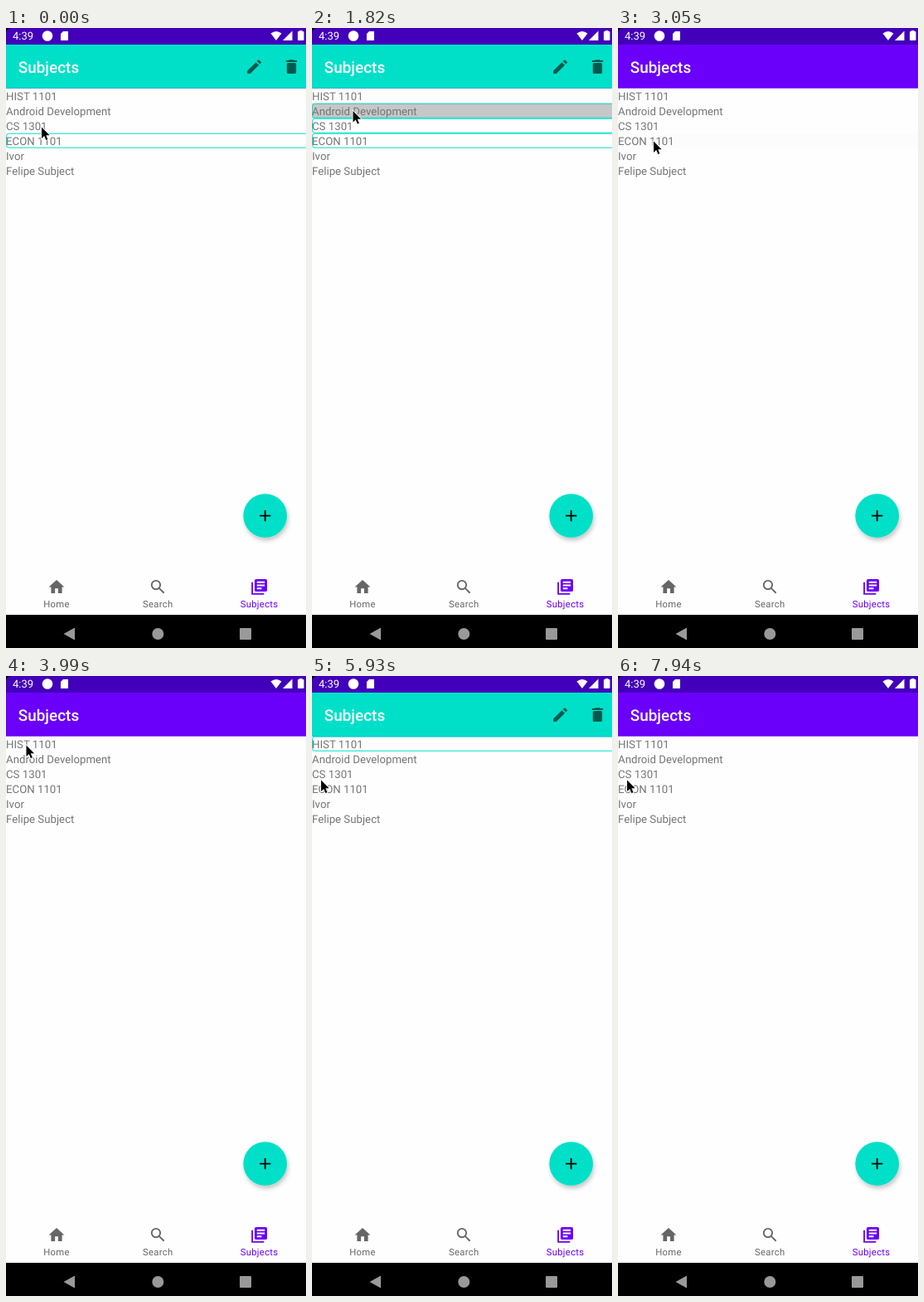
Recreate the animation shown at these times as an HTML page. Size 362x747 px, loop 8 s.

```html
<!DOCTYPE html>
<html lang="en">
<head>
<meta charset="utf-8">
<title>Subjects</title>
<style>
  :root { --teal: #00e0c8; --purple: #6b00fa; --paper: #fefefe; }
  html, body { margin: 0; width: 100%; height: 100%; overflow: hidden; background: var(--paper); }
  svg { display: block; width: 100%; height: 100%; }
  text { font-family: Roboto, sans-serif; text-rendering: geometricPrecision; }
  .title { font-size: 18.9px; font-weight: 500; fill: #fff; }
  .row { font-size: 13.24px; fill: #757575; }
  .tab { font-size: 11.3px; letter-spacing: .3px; text-anchor: middle; }
  .outline { fill: none; stroke: var(--teal); }
  .line { fill: none; stroke: currentColor; stroke-width: 2; }
</style>
</head>
<body>
<svg viewBox="0 0 362 747">
  <defs>
    <filter id="shadow" x="-30%" y="-30%" width="160%" height="170%">
      <feDropShadow dx="1.5" dy="3.5" stdDeviation="2.5" flood-opacity=".22"/>
    </filter>
  </defs>
  <rect width="362" height="747" fill="var(--paper)"/>

  <!-- Status bar -->
  <rect width="362" height="20" fill="#4200ba"/>
  <path d="M0 0H6A6 6 0 0 0 0 6Z"/>
  <g fill="#fff">
    <text x="8" y="14" font-size="13">4:39</text>
    <circle cx="50" cy="9.5" r="6.3"/>
    <path d="M69 4H75V15H66V7Z"/>
    <path d="M319.5 6.5Q326 1.5 332.5 6.5L326 15Z"/>
    <path d="M345.5 3.5V15H334Z"/>
    <rect x="352" y="4" width="7.5" height="11" rx="1"/>
    <rect x="354" y="3" width="3.5" height="2"/>
  </g>

  <!-- App bar -->
  <rect y="20" width="362" height="52.7" fill="var(--purple)"/>
  <rect id="tealBar" y="20" width="362" height="52.7" fill="var(--teal)"/>
  <text class="title" x="14.8" y="54">Subjects</text>
  <g id="actions" fill-opacity=".6">
    <path transform="translate(288.4 35.3) scale(.943)"
      d="M3 21V17.2L14 6.2 17.8 10 6.8 21ZM15.2 5 17.4 2.8 21.2 6.6 19 8.8Z"/>
    <g transform="translate(333.2 35.3) scale(.943)">
      <rect x="6" y="7" width="12" height="14" rx="1.8"/>
      <path d="M5 6V4H8.5L9.5 3H14.5L15.5 4H19V6Z"/>
    </g>
  </g>

  <g id="list"></g>

  <!-- Add button -->
  <circle cx="312.7" cy="587.6" r="26.4" fill="var(--teal)" filter="url(#shadow)"/>
  <path d="M306 587.6H319.4M312.7 581V594.3" stroke="#000" stroke-width="1.9"/>

  <g id="tabs"></g>

  <!-- System navigation -->
  <rect y="707" width="362" height="40"/>
  <g fill="#999">
    <path d="M83 722.5V737.5L69.5 730Z"/>
    <circle cx="183.3" cy="730" r="7"/>
    <rect x="282" y="723" width="14" height="14" rx="1"/>
  </g>

  <path id="cursor" d="M1 1V14.5L4.2 11.6 6.3 16.6 8.4 15.7 6.3 10.8H10.6Z"
    stroke="#fff" stroke-width="1.6" paint-order="stroke"/>
</svg>

<script>
const LOOP = 8000;
const ROW_TOP = 72.7, ROW_HEIGHT = 18;
const RIPPLE_IN = 160, SELECT = 290, BAR_FADE = 330, RELEASE = 360, RIPPLE_OUT = 200;

const subjects = ["HIST 1101", "Android Development", "CS 1301", "ECON 1101", "Ivor", "Felipe Subject"];
const tabs = [
  { label: "Home", icon: `<path d="M10 20H5V12H2L12 3 22 12H19V20H14V14H10Z"/>` },
  { label: "Search", icon: `<circle class="line" cx="9.5" cy="9.5" r="5.5"/><path class="line" d="M13.5 13.5 19.8 19.8"/>` },
  { label: "Subjects", icon: `<rect x="6" y="2" width="16" height="16" rx="2"/><path class="line" d="M3 6V21H18"/>
    <path class="line" style="color: var(--paper)" d="M9 6H19M9 10H19M9 14H15"/>`, active: true }
];

// Each tap names the rows that stay selected after it.
const taps = [
  { at: -LOOP, row: 3, selected: [3] },
  { at: 520, row: 2, selected: [2, 3] },
  { at: 1490, row: 1, selected: [1, 2, 3] },
  { at: 2500, row: 3, selected: [] },
  { at: 4200, row: 0, selected: [0] },
  { at: 6400, row: 2, selected: [2] },
  { at: 7140, row: 2, selected: [] }
];
const moves = [
  { at: 50, over: 1, x: 38.5, y: 114.5 },
  { at: 930, over: 170, x: 48.5, y: 99 },
  { at: 1960, over: 210, x: 42, y: 135.5 },
  { at: 3350, over: 640, x: 23.5, y: 82.5 },
  { at: 5270, over: 1, x: 19, y: 82.5 },
  { at: 5760, over: 170, x: 10, y: 124.5 }
];

const byId = id => document.getElementById(id);
const clamp = v => Math.max(0, Math.min(1, v));
const ease = v => (v = clamp(v), v * v * (3 - 2 * v));
const mix = (a, b, p) => a + (b - a) * p;

byId("list").innerHTML = subjects.map((name, i) => {
  const y = ROW_TOP + i * ROW_HEIGHT;
  return `<rect class="press" y="${y}" width="362" height="${ROW_HEIGHT}"/>
    <rect class="outline" x=".5" y="${y + .5}" width="370" height="${ROW_HEIGHT - 1}" rx="3"/>
    <text class="row" y="${y + 14.2}">${name}</text>`;
}).join("");

byId("tabs").innerHTML = tabs.map(({ label, icon, active }, i) => {
  const x = 61 + i * 122.3;
  return `<g fill="currentColor" style="color: ${active ? "var(--purple)" : "#666"}">
    <g transform="translate(${x - 11.3} 662.1) scale(.943)">${icon}</g>
    <text class="tab" x="${x}" y="697.5">${label}</text></g>`;
}).join("");

const pressRects = document.querySelectorAll(".press");
const outlines = document.querySelectorAll(".outline");

function ripple(age) {
  return Math.min(clamp(age / RIPPLE_IN), clamp((RELEASE + RIPPLE_OUT - age) / RIPPLE_OUT));
}

function draw(t) {
  const { selected } = taps.findLast(tap => t >= tap.at + SELECT);
  subjects.forEach((_, i) => {
    const shade = taps.filter(tap => tap.row === i).map(tap => ripple(t - tap.at));
    outlines[i].style.display = selected.includes(i) ? "" : "none";
    pressRects[i].setAttribute("opacity", .215 * Math.max(0, ...shade));
  });

  const teal = taps.reduce((level, tap) =>
    mix(level, tap.selected.length ? 1 : 0, ease((t - tap.at - BAR_FADE) / 200)), 0);
  byId("tealBar").setAttribute("opacity", teal);
  byId("actions").setAttribute("opacity", selected.length ? teal : 0);

  let x = 42, y = 118.5;
  for (const move of moves) {
    const p = ease((t - move.at) / move.over + (move.over === 1));
    x = mix(x, move.x, p);
    y = mix(y, move.y, p);
  }
  byId("cursor").setAttribute("transform", `translate(${x} ${y})`);
}

const start = performance.now();
function tick() {
  draw((performance.now() - start) % LOOP);
  requestAnimationFrame(tick);
}
tick();
</script>
</body>
</html>
```
